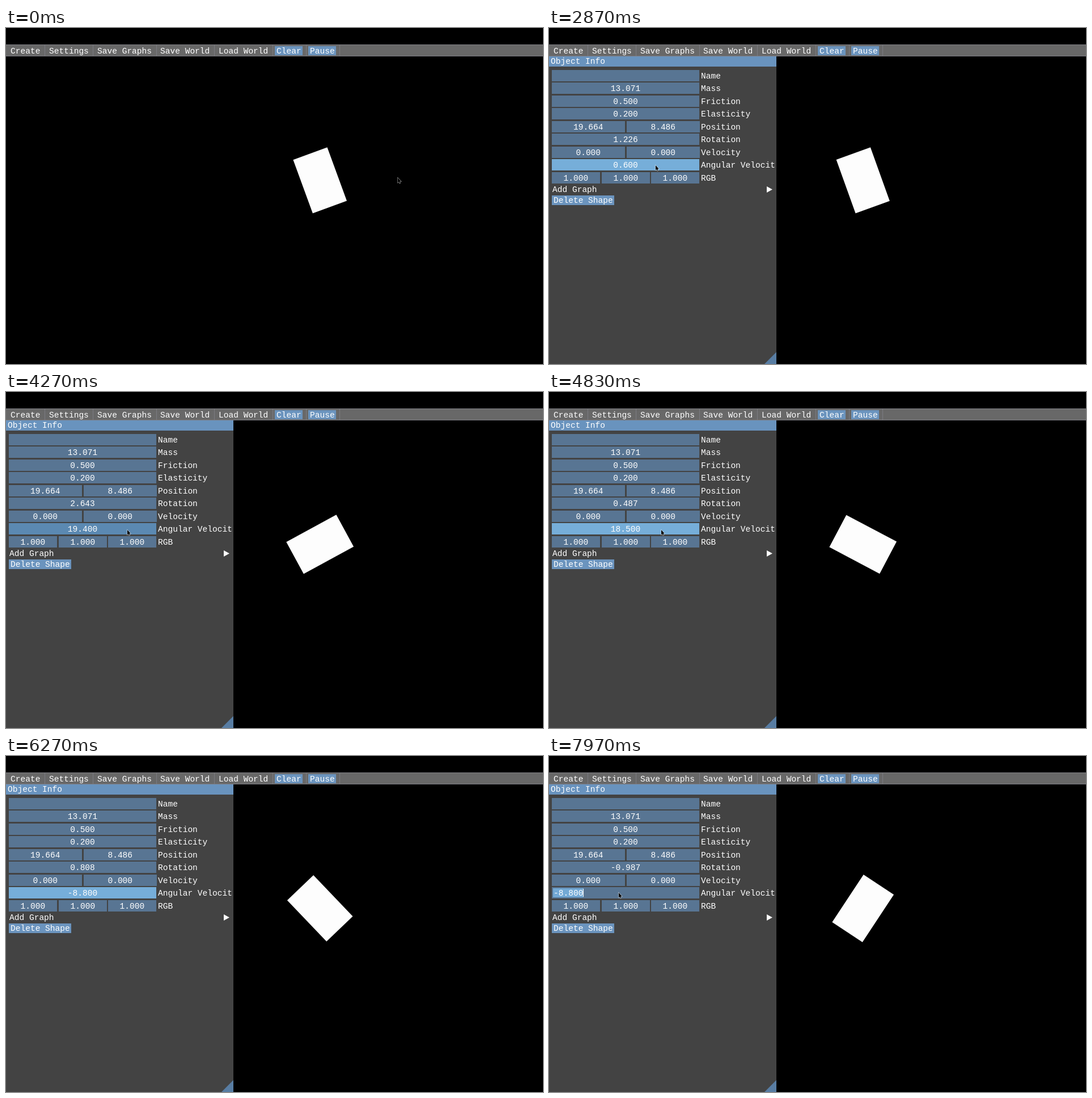
Write an HTML page with a canvas that moves like this. It is 947 by 592 pixels and loops after 8 s.

```html
<!DOCTYPE html>
<html lang="en">
<head>
<meta charset="utf-8">
<title>Object Info</title>
<style>
  html, body { margin: 0; width: 100%; height: 100%; overflow: hidden; background: #000; }
  canvas { display: block; }
</style>
</head>
<body>
<canvas id="stage" width="947" height="592"></canvas>
<script>
const ctx = document.getElementById('stage').getContext('2d');
const LOOP = 8000, PANEL_AT = 1400, EDIT_AT = 7600;
const CHAR = 8.73;          // advance of one letter
const PER_PIXEL = 0.1;      // angular velocity per dragged pixel
const SIM_RATE = 0.96;      // simulated seconds per real second
const FIRST_ANGLE = 1.22;
const C = {
  bar: '#686868', panel: '#434343', title: '#6993be', button: '#6b94be',
  field: '#587593', hover: '#5b89b2', active: '#76aed9', select: '#73a9d5',
  line: '#7c7c82', grip: '#587da3', text: '#fff', shape: '#fdfdfd'
};

// Pointer moves; drags are steady and change the angular velocity.
const HOME = { x: 691, y: 264 };
const MOVES = [
  { from: 0, to: 1250, x: 545, y: 266 },
  { from: 1930, to: 2600, x: 182, y: 242 },
  { from: 2850, to: 3513, x: 376, y: 241, drag: true },
  { from: 3700, to: 4350, x: 207, y: 243 },
  { from: 4784, to: 5430, x: 87, y: 245, drag: true },
  { from: 5430, to: 6231, x: -75, y: 243, drag: true },
  { from: 6400, to: 7160, x: 123, y: 241 }
];
MOVES.forEach((m, i) => {
  const last = MOVES[i - 1] || HOME;
  m.dx = m.x - last.x;
  m.dy = m.y - last.y;
});
const DRAGS = MOVES.filter(m => m.drag);

const smooth = u => u * u * (3 - 2 * u);
const progress = (m, t) => Math.min(1, Math.max(0, (t - m.from) / (m.to - m.from)));

function pointerAt(t) {
  let { x, y } = HOME;
  for (const m of MOVES) {
    const u = progress(m, t), k = m.drag ? u : smooth(u);
    x += m.dx * k;
    y += m.dy * k;
  }
  return { x: Math.round(x), y: Math.round(y) };
}

function speedAt(t) {
  const px = DRAGS.reduce((sum, m) => sum + m.dx * progress(m, t), 0);
  return Math.round(px) * PER_PIXEL;
}

// Integral of the angular velocity, wrapped to one turn.
function angleAt(t) {
  let sum = 0;
  for (const m of DRAGS) {
    const u = progress(m, t);
    sum += m.dx * ((m.to - m.from) * u * u / 2 + Math.max(0, t - m.to));
  }
  const a = FIRST_ANGLE + sum * PER_PIXEL * SIM_RATE / 1000;
  return Math.atan2(Math.sin(a), Math.cos(a));
}

function box(x, y, w, h, color) {
  ctx.fillStyle = color;
  ctx.fillRect(x, y, w, h);
}

function text(str, x, y, align = 'left') {
  ctx.fillStyle = C.text;
  ctx.textAlign = align;
  ctx.fillText(str, x, y);
}

function path(points, x = 0, y = 0) {
  ctx.beginPath();
  points.forEach(([px, py]) => ctx.lineTo(x + px, y + py));
  ctx.closePath();
}

function triangle(points, color) {
  path(points);
  ctx.fillStyle = color;
  ctx.fill();
}

function drawMenu() {
  box(0, 29, 947, 21, C.line);
  box(0, 30, 947, 19, C.bar);
  let x = 8;
  for (const label of ['Create', 'Settings', 'Save Graphs', 'Save World', 'Load World', 'Clear', 'Pause']) {
    const w = label.length * CHAR;
    if (label === 'Clear' || label === 'Pause') box(Math.round(x) - 3, 32, 49, 16, C.button);
    text(label, Math.round(x), 45);
    x += w + 15.3;
    box(Math.round(x - 7.5), 30, 1, 19, C.line);
  }
}

function drawShape(angle) {
  ctx.save();
  ctx.translate(553.7, 268.4);
  ctx.rotate(angle);
  box(-50.2, -32, 100.4, 64, C.shape);
  ctx.restore();
}

function drawRow(i, label, values, color = C.field) {
  const y = Math.round(73.5 + i * 22.5), n = values.length, gap = 3;
  const w = (260 - gap * (n - 1)) / n;
  values.forEach((v, k) => {
    const x = Math.round(5 + k * (w + gap));
    box(x, y, Math.round(w), 20, color);
    text(v, x + w / 2, y + 15, 'center');
  });
  text(label, 268, y + 15);
}

function fieldColor(t, p) {
  if (t >= EDIT_AT) return C.field;
  if (DRAGS.some(m => t >= m.from && t < m.to + 150)) return C.active;
  const over = p.x >= 5 && p.x <= 265 && p.y >= 231 && p.y <= 251;
  return over ? C.hover : C.field;
}

function drawPanel(t, p) {
  const editing = t >= EDIT_AT, speed = speedAt(t).toFixed(3);
  box(0, 50, 401, 542, C.panel);
  box(0, 50, 401, 18, C.title);
  triangle([[401, 571], [401, 592], [380, 592]], C.grip);

  ctx.save();
  ctx.beginPath();
  ctx.rect(0, 50, 399, 542);
  ctx.clip();
  text('Object Info', 3, 63);
  const rows = [
    ['Name', ''], ['Mass', '13.071'], ['Friction', '0.500'], ['Elasticity', '0.200'],
    ['Position', '19.664', '8.486'], ['Rotation', angleAt(t).toFixed(3)],
    ['Velocity', '0.000', '0.000'], ['Angular Velocity', editing ? '' : speed],
    ['RGB', '1.000', '1.000', '1.000']
  ];
  rows.forEach(([label, ...values], i) =>
    drawRow(i, label, values, label === 'Angular Velocity' ? fieldColor(t, p) : C.field));
  if (editing) {
    box(7, 233, 54, 16, C.select);
    text(speed, 8, 246);
    box(60, 234, 1, 14, C.text);
  }
  text('Add Graph', 6, 289);
  triangle([[384, 279], [394, 284.5], [384, 290]], C.text);
  box(5, 295, 110, 17, C.button);
  text('Delete Shape', 8, 308);
  ctx.restore();
}

function drawPointer({ x, y }) {
  path([[0, 0], [0, 8.5], [1.9, 6.9], [3.1, 9.6], [4.4, 9], [3.3, 6.4], [5.7, 6.2]], x, y);
  ctx.lineWidth = 1.2;
  ctx.strokeStyle = 'rgba(255,255,255,.65)';
  ctx.stroke();
  ctx.fillStyle = '#000';
  ctx.fill();
}

function draw(t) {
  const p = pointerAt(t);
  box(0, 0, 947, 592, '#000');
  ctx.font = '14.55px "Liberation Mono", monospace';
  drawShape(angleAt(t));
  drawMenu();
  if (t >= PANEL_AT) drawPanel(t, p);
  drawPointer(p);
}

const start = performance.now();
function tick() {
  const t = (performance.now() - start) % LOOP;
  // Thirty pictures a second, on a 10 ms grid.
  const n = Math.floor((t + 4.9) * 0.03);
  draw(Math.round(n * 10 / 3) * 10);
  requestAnimationFrame(tick);
}
tick();
</script>
</body>
</html>
```
